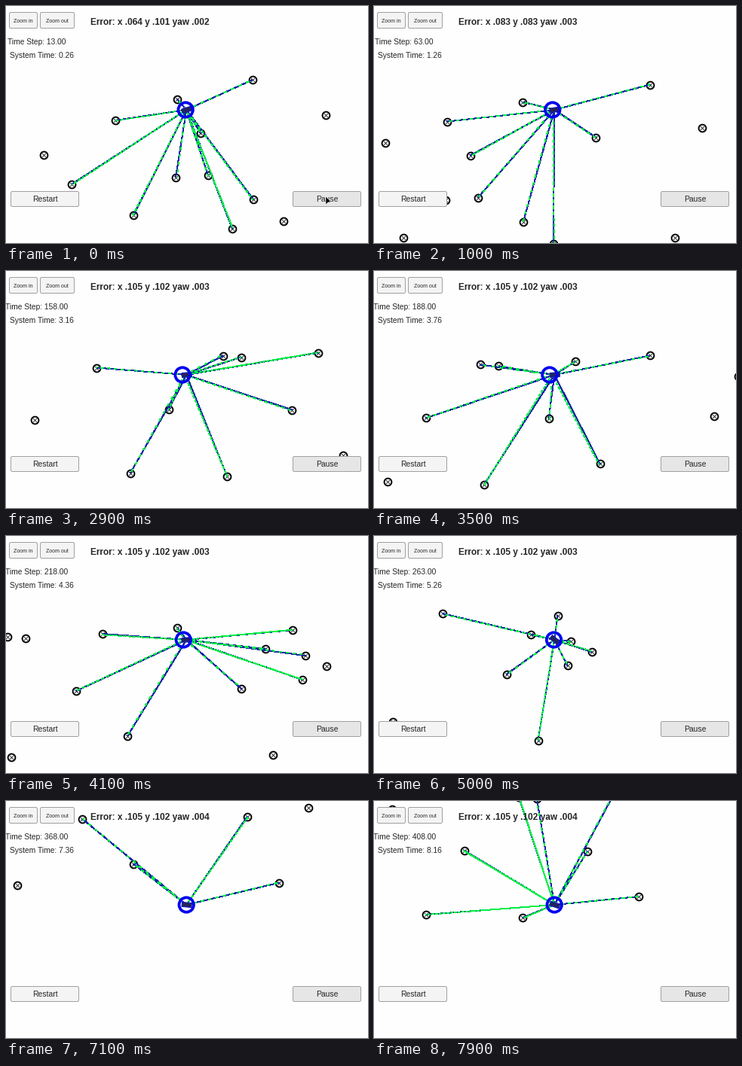
Recreate the animation shown at these times as a matplotlib script. Size 480 px wide and 315 px high, loop 8 s.

```python
import numpy as np
import matplotlib.pyplot as plt
from matplotlib.animation import FuncAnimation
from matplotlib.collections import LineCollection
from matplotlib.patches import Circle, FancyBboxPatch, Polygon, Rectangle

W, H, FRAMES, STEP_MS = 480, 315, 80, 100
CAR = np.array([239.2, 138.0])
SENSOR_RANGE = 183
BLUE, GREEN, INK = "#1428a4", "#00ee46", "#262626"

# The fixed landmark map, in pixels of the opening view.
LANDMARKS = np.array([
    (327, 98), (227, 124), (145, 152), (424, 145), (50, 198), (87, 237),
    (258, 169), (225, 228), (268, 225), (328, 257), (169, 278), (300, 296),
    (368, 286), (496, 75), (565, 132), (529, 278), (815, 47), (839, 49),
    (941, 43), (647, 63), (743, 118), (906, 119), (692, 203), (820, 207),
    (974, 179), (1040, 35), (1193, 38), (1157, 63), (1210, 72), (1206, 104),
    (1238, 86), (1125, 116), (1167, 204)])

# Waypoints of the scrolling map; speeds follow from their spacing.
TIMES = np.array([0, 10, 29, 41, 45, 50, 62, 79])
SHIFT = np.array([(0, 0), (-130, 29.5), (-527, 65.5), (-813, 87),
                  (-887, 90), (-949.5, 68), (-926, -74.5), (-623, -52)])
SPEED = np.gradient(SHIFT, TIMES, axis=0, edge_order=2)


def scroll(t):
    """Cubic Hermite path through the waypoints."""
    k = np.clip(np.searchsorted(TIMES, t, side="right") - 1, 0, len(TIMES) - 2)
    h = TIMES[k + 1] - TIMES[k]
    s = (t - TIMES[k]) / h
    ease = s * s * (3 - 2 * s)
    return ((1 - ease) * SHIFT[k] + ease * SHIFT[k + 1]
            + h * s * (1 - s) * ((1 - s) * SPEED[k] - s * SPEED[k + 1]))


def velocity(t):
    return (scroll(t - 0.1) - scroll(t + 0.1)) / 0.2


def errors(i):
    x = 0.064 + 0.041 * min(i / 22, 1)
    y = 0.102 - 0.019 * np.exp(-((i - 10) / 6) ** 2)
    yaw = 0.0024 + 0.00002 * i
    return [f"{v:.3f}"[1:] for v in (x, y, yaw)]


fig = plt.figure(figsize=(W / 72, H / 72), dpi=72, facecolor="#fefeff")
ax = fig.add_axes([0, 0, 1, 1])
ax.set_xlim(0, W)
ax.set_ylim(H, 0)
ax.axis("off")


def label(x, y, text="", size=10.2, ha="center", weight="normal"):
    return ax.text(x, y, text, fontsize=size, ha=ha, va="baseline", weight=weight,
                   color=INK, family="Liberation Sans", zorder=9)


def button(x, y, w, h, text, size=10.4, fill="#f4f4f4"):
    ax.add_patch(FancyBboxPatch((x + 1.5, y + 1.5), w - 3, h - 3,
                                boxstyle="round,pad=1.5,rounding_size=2",
                                fc=fill, ec="#a0a0a0", lw=1, zorder=8))
    label(x + w / 2, y + h / 2 + size * 0.36, text, size)


button(4.5, 8.5, 37, 21, "Zoom in", 7)
button(45.5, 8.5, 45, 21, "Zoom out", 7)
button(6.5, 246.5, 90, 20, "Restart")
button(380.5, 246.5, 90, 20, "Pause", fill="#e6e6e6")

error = label(112, 25, size=11.9, ha="left", weight="bold")
step = label(40.3, 51)
clock = label(47.5, 69.2)

circles, = ax.plot([], [], "o", ms=9.8, mew=1.9, mfc="none", mec="black", zorder=3)
crosses, = ax.plot([], [], "x", ms=6.2, mew=0.9, mec="#222222", zorder=3)
truth = ax.add_collection(LineCollection([], colors=BLUE, linewidths=1,
                                         antialiaseds=False, zorder=4))
sensed = ax.add_collection(LineCollection([], colors=GREEN, linewidths=1,
                                          antialiaseds=False, zorder=4))
car = ax.add_patch(Rectangle(CAR - (6, 3), 13, 6, rotation_point="center",
                             fc="#23235a", ec="#1414c8", lw=1, zorder=5))
ring = ax.add_patch(Circle(CAR, 9.7, fill=False, ec="#0000f0", lw=3.8, zorder=6))
cursor = ax.add_patch(Polygon([(424, 253), (424, 264), (427, 261), (431, 260.5)],
                              fc="black", ec="white", lw=0.5, zorder=10))


def update(i):
    rng = np.random.default_rng(100 + i)
    pts = LANDMARKS + scroll(i)
    circles.set_data(pts.T)
    crosses.set_data(pts.T)

    vx, vy = velocity(i)
    car.angle = np.degrees(np.arctan2(vy, vx))
    # The estimate trails behind while driving to the right.
    estimate = CAR - (0.01 * max(vx, 0) ** 2, 0)
    ring.center = estimate

    seen = pts[np.hypot(*(pts - CAR).T) < SENSOR_RANGE]
    noisy = seen + rng.normal(0, 0.7, seen.shape)
    truth.set_segments([(CAR, p) for p in seen])
    sensed.set_segments([((CAR + estimate) / 2, p) for p in noisy])
    # Broken strokes let the blue ray show through the green one.
    sensed.set_linestyle([(0, (3, rng.uniform(0.5, 8))) for _ in seen])

    error.set_text("Error: x {} y {} yaw {}".format(*errors(i)))
    step.set_text(f"Time Step: {13 + 5 * i:.2f}")
    clock.set_text(f"System Time: {0.26 + 0.1 * i:.2f}")
    cursor.set_visible(i < 5)
    return circles, crosses, truth, sensed, car, ring, error, step, clock, cursor


anim = FuncAnimation(fig, update, frames=FRAMES, interval=STEP_MS,
                     repeat=True, repeat_delay=0, blit=False)
plt.show()
```
